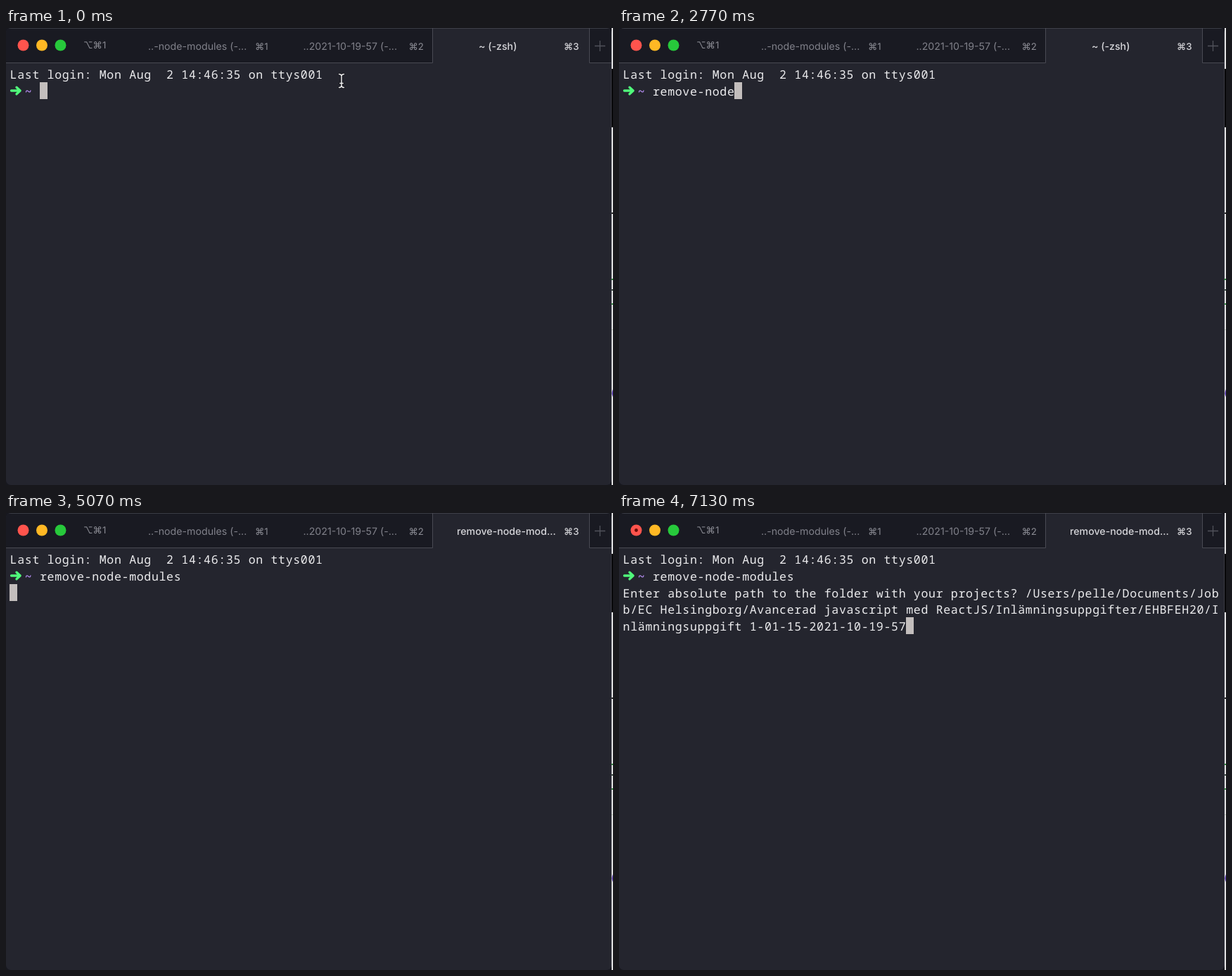
An HTML page that plays this animation: 863 px wide and 649 px high, repeating every 8 s.

```html
<!DOCTYPE html>
<html lang="en">
<head>
<meta charset="utf-8">
<title>Terminal</title>
<style>
html, body { margin: 0; width: 100%; height: 100%; overflow: hidden; background: #24252e; }
svg { display: block; }
text { white-space: pre; text-rendering: geometricPrecision; }
.mono { font: 16.6px "Noto Sans Mono", "DejaVu Sans Mono", monospace; letter-spacing: .64px; fill: #ececee; }
.tilde { font-weight: 600; fill: #b48cf0; }
.tab { font: 14.2px Inter, "DejaVu Sans", sans-serif; fill: #80818a; }
.key { font-size: 13.3px; fill: #8b8c94; }
.active { font-weight: 500; fill: #d6d6da; }
.line { fill: none; stroke: #494a53; }
</style>
</head>
<body>
<svg width="863" height="649" viewBox="0 0 863 649">
  <rect width="863" height="649" fill="#17181f"/>
  <g id="behind">
    <rect x="861" width="2" height="649" fill="#dededf"/>
    <rect x="861" y="58" width="2" height="83" fill="#08080a"/>
    <rect x="861" y="262" width="2" height="2" fill="#222"/>
    <rect x="861" y="356" width="2" height="2" fill="#2f8a3c"/>
    <rect x="861" y="371" width="2" height="2" fill="#33443a"/>
    <rect x="861" y="391" width="2" height="2" fill="#2f8a3c"/>
    <rect x="861" y="428" width="2" height="1" fill="#b9c7b4"/>
    <path d="M863 513q-3 6 0 11z" fill="#4a2aa8"/>
  </g>
  <clipPath id="win"><rect width="861" height="649" rx="7"/></clipPath>
  <g clip-path="url(#win)">
    <rect width="861" height="649" fill="#24252e"/>
    <path d="M0 0H606V49H0zM830 0H861V49H830z" fill="#191a22"/>
    <path class="line" d="M0 49.5H606.5V0M861 49.5H829.5V0"/>
    <path class="line" d="M0 .5H861" opacity=".7"/>
    <path class="line" d="M860.5 0V649" opacity=".6"/>
    <path d="M837 25.5H852M844.5 18V33" stroke="#50515a" stroke-width="1.3"/>
  </g>
  <circle cx="24.5" cy="24.5" r="8" fill="#ff544d"/>
  <circle cx="51" cy="24.5" r="8" fill="#ffb824"/>
  <circle cx="77.5" cy="24.5" r="8" fill="#27c93b"/>
  <circle id="busy" cx="24.5" cy="24.5" r="2.4" fill="#6c0c08"/>

  <g class="tab">
    <text class="key" x="110" y="28.7">⌥⌘1</text>
    <text x="202" y="30.5">..-node-modules (-...</text>
    <text class="key" x="354" y="30.5">⌘1</text>
    <text x="422.5" y="30.5">..2021-10-19-57 (-...</text>
    <text class="key" x="572.5" y="30.5">⌘2</text>
    <text class="active" id="title" y="30.5"></text>
    <text class="key active" x="793" y="30.5">⌘3</text>
  </g>

  <g id="screen" class="mono"></g>
  <path d="M7.5 89H19M15 84.2L20.2 89L15 93.8" fill="none" stroke="#50fa7b" stroke-width="3.3" stroke-linecap="round" stroke-linejoin="round"/>
  <text class="mono tilde" x="26.7" y="95.6">~</text>
  <rect id="cursor" width="11" height="24" fill="#c3bebd"/>
  <g id="mouse" fill="none" stroke-linecap="round">
    <path id="beam" d="M473.5 65.5q3 0 3.5 2.5q.5-2.5 3.5-2.5M477 68V82M474.8 78.5H479.2M473.5 84.5q3 0 3.5-2.5q.5 2.5 3.5 2.5"/>
    <use href="#beam" stroke="#101015" stroke-width="3"/>
    <use href="#beam" stroke="#f0f0f2" stroke-width="1.5"/>
  </g>
</svg>
<script>
const LOOP = 8000, LEFT = 5.2, TOP = 53, COL = 10.6, ROW = 23.85, COLS = 80;
const COMMAND = "remove-node-modules";
const QUESTION = "Enter absolute path to the folder with your projects? ";
const PATH = "/Users/pelle/Documents/Jobb/EC Helsingborg/Avancerad javascript med ReactJS" +
  "/Inlämningsuppgifter/EHBFEH20/Inlämningsuppgift 1-01-15-2021-10-19-57";
// One time per typed letter of the command
const KEYS = [230, 370, 530, 630, 800, 930, 1230, 1600, 1870, 2000, 2770,
  3000, 3370, 3530, 3670, 3800, 4100, 4200, 4400];
const ENTER = 5000, RETITLE = 5030, ASK = 5570, BUSY = 5770, PASTE = 6970;

const $ = id => document.getElementById(id);
const NS = "http://www.w3.org/2000/svg";
const show = (id, on) => $(id).setAttribute("visibility", on ? "visible" : "hidden");

const rows = Array.from({ length: 5 }, (_, i) => {
  const row = document.createElementNS(NS, "text");
  row.setAttribute("x", LEFT + .4);
  row.setAttribute("y", TOP + 18.8 + i * ROW);
  return $("screen").appendChild(row);
});

function setText(el, text) {
  if (el.textContent !== text) el.textContent = text;
}

function draw(t) {
  const typed = COMMAND.slice(0, KEYS.filter(k => t >= k).length);
  const output = (t >= ASK ? QUESTION : "") + (t >= PASTE ? PATH : "");
  const lines = ["Last login: Mon Aug  2 14:46:35 on ttys001", "    " + typed];
  if (t >= ENTER) {
    for (let i = 0; i === 0 || i < output.length; i += COLS) lines.push(output.slice(i, i + COLS));
  }
  rows.forEach((row, i) => setText(row, lines[i] || ""));

  // The block cursor sits on whole pixels
  const last = lines.length - 1;
  $("cursor").setAttribute("x", Math.round(LEFT + lines[last].length * COL));
  $("cursor").setAttribute("y", Math.round(TOP + last * ROW));

  const running = t >= RETITLE;
  setText($("title"), running ? "remove-node-mod..." : "~ (-zsh)");
  $("title").setAttribute("x", running ? 641 : 672);
  show("busy", t >= BUSY);
  show("mouse", t < KEYS[0]);
}

const start = performance.now();
function tick() {
  draw((performance.now() - start) % LOOP);
  requestAnimationFrame(tick);
}
tick();
</script>
</body>
</html>
```
